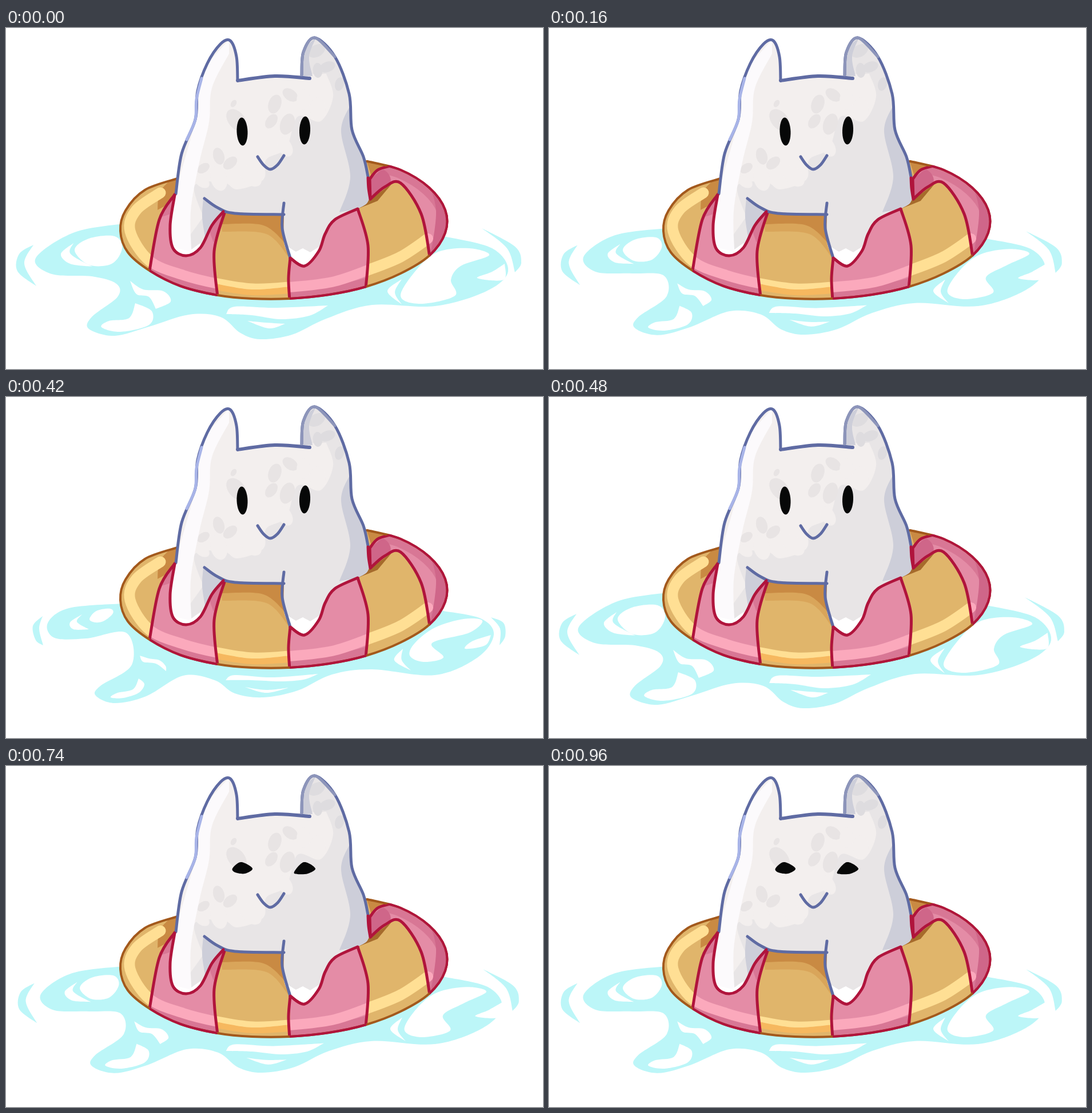
Write an HTML page with a canvas that moves like this. It is 939 px wide and 596 px high and loops after 1.12 s.

```html
<!DOCTYPE html>
<html lang="en">
<head>
<meta charset="utf-8">
<title>Floating cat</title>
<style>
  html, body { margin: 0; width: 100%; height: 100%; overflow: hidden; background: #fff; }
  canvas { display: block; }
</style>
</head>
<body>
<canvas id="stage" width="939" height="596"></canvas>
<script>
const ctx = document.getElementById('stage').getContext('2d');
ctx.lineCap = ctx.lineJoin = 'round';

// "x,y" marks a smooth point, "x,y!" a sharp corner.
const parse = text => text.split(' ').map(word => {
  const [x, y] = word.replace('!', '').split(',').map(Number);
  return { x, y, sharp: word.endsWith('!') };
});

// Smooth curve through all points; corners are doubled to break the tangent.
function curve(points, closed = true) {
  const nodes = points.flatMap(p => p.sharp ? [p, p] : [p]);
  const n = nodes.length;
  const at = i => nodes[closed ? (i + n) % n : Math.max(0, Math.min(n - 1, i))];
  const path = new Path2D();
  path.moveTo(nodes[0].x, nodes[0].y);
  for (let i = 0; i < (closed ? n : n - 1); i++) {
    const [a, b, c, d] = [at(i - 1), at(i), at(i + 1), at(i + 2)];
    if (b === c) continue;
    path.bezierCurveTo(b.x + (c.x - a.x) / 6, b.y + (c.y - a.y) / 6,
                       c.x - (d.x - b.x) / 6, c.y - (d.y - b.y) / 6, c.x, c.y);
  }
  return path;
}
const shape = text => curve(parse(text));
const merge = (...texts) => {
  const path = new Path2D();
  texts.forEach(text => path.addPath(shape(text)));
  return path;
};

function fill(color, path) {
  ctx.fillStyle = color;
  ctx.fill(typeof path === 'string' ? shape(path) : path);
}
function stroke(color, width, path) {
  ctx.strokeStyle = color;
  ctx.lineWidth = width;
  ctx.stroke(typeof path === 'string' ? curve(parse(path), false) : path);
}
function within(path, draw) {
  ctx.save();
  ctx.clip(path);
  draw();
  ctx.restore();
}

const BLUE = '#5f6ba3', RED = '#b0143c', BROWN = '#a3591c', WATER = '#bcf6f8', FOAM = '#fff';

// Water shapes go from wide to narrow; middle is the share of the way in the in-between pose.
function wave(color, wide, narrow, pose, middle = 0.42) {
  const share = [0, middle, 1][pose];
  const end = parse(narrow);
  fill(color, curve(parse(wide).map((p, i) => ({
    x: p.x + (end[i].x - p.x) * share,
    y: p.y + (end[i].y - p.y) * share,
    sharp: p.sharp
  }))));
}

function drawWater(pose) {
  wave(WATER,
    '215,341! 120,357 52,402 80,430 150,434 193,447 195,470 150,505 145,526 190,538 250,522 320,501 375,505 410,533 445,544 500,536 560,508 640,484 750,486 840,460 878,425 850,385 765,364!',
    '205,361! 110,369 73,395 85,421 140,422 210,412 220,468 165,505 157,522 190,535 245,523 310,487 365,495 400,518 450,525 510,513 570,485 640,476 750,486 825,455 853,415 830,387 765,374!', pose);
  wave(WATER, '48,379! 23,395 20,425 53,451! 32,412', '64,383! 47,400 52,425 65,434! 58,405', pose, 0.1);
  wave(WATER, '832,350! 890,382 901,410 890,427! 876,385', '848,385! 870,395 873,418 863,434! 864,405', pose, 0.15);
  // left foam
  wave(FOAM, '120,388 145,368 190,364 203,385 185,412 145,414', '146,388 158,374 182,370 187,378 172,391 156,394', pose, 0.35);
  wave(FOAM, '118,376! 96,395 112,412 151,417! 113,395', '133,380! 112,394 118,406 145,406! 124,393', pose);
  wave(FOAM, '217,442! 240,457 275,460 288,478 262,491! 250,470 228,465', '234,452! 250,457 268,460 279,470 280,479! 262,466 240,463', pose);
  wave(FOAM, '226,481! 255,495 250,519 200,531 167,523 180,512 215,507', '232,492! 242,502 232,517 205,526 183,525 195,517 222,511', pose);
  // front foam
  wave(FOAM, '385,500! 400,487 470,489 563,485! 530,503 480,509 430,502', '384,495! 400,486 465,490 546,484! 520,494 480,497 430,495', pose);
  wave(FOAM, '422,512! 455,515 488,517! 460,525', '418,507! 455,512 495,508! 455,517', pose);
  // right foam
  wave(FOAM, '756,391 810,385 845,397 795,416 778,440 785,468 725,482 690,468 720,420', '750,403 800,388 833,391 810,412 745,430 765,455 730,463 706,452 715,430', pose);
  wave(FOAM, '692,439! 667,460 692,483! 680,462', '694,440! 679,460 708,478! 692,460', pose);
  wave(FOAM, '872,412! 870,440 824,437 850,426', '848,416! 838,434 803,440 815,427', pose, 0.15);
}

const ring = shape('300,263! 243,283 209,319 200,355 213,392 251,424 305,451 370,467 430,473 495,473 565,466 630,452 690,429 740,398 768,358 768,318 740,279 690,248 632,233!');
const pink = merge(
  '295,291! 268,335 251,421! 251,445! 371,480! 364,390 383,320! 345,290!',
  '490,380! 497,402! 496,482! 629,470! 633,380 615,316! 560,300!',
  '636,264! 650,248 672,239! 790,240! 790,345! 742,404! 726,325 690,271 660,279 637,299!');
const rimLight = '270,288 228,318 217,355 251,407 310,432 370,447 432,456 495,453 570,444 633,423 690,400 738,368';

function drawRing() {
  within(ring, () => {
    fill('#e0b56b', ring);
    fill('#c98a43', '300,255! 270,285 265,318! 300,300!');
    fill('#c98a43', '628,225! 675,238! 640,262!');
    fill('#d9a55a', '375,325! 490,325! 494,400! 455,360 378,356!');
    fill('#c98a43', '375,318! 490,325! 490,378! 450,345 378,343!');
    stroke('#ffdf94', 19, rimLight);
    fill('#f6b85f', '367,447! 430,457 497,452! 497,464! 430,467 367,458!');
    within(pink, () => {
      fill('#e48ca6', pink);
      stroke('#d87795', 30, ring);
      fill('#d87795', '297,291! 268,328 288,325!');
      fill('#d87795', '352,345! 383,320! 363,375!');
      stroke('#fba9bc', 18, rimLight);
      fill('#cf6689', '737,265! 752,320 742,400! 790,360! 790,280!');
      fill('#cf6689', '637,264! 660,248 672,270 637,299!');
    });
    fill('#a66b2c', '608,319! 637,299! 674,273! 650,302!');
    stroke(RED, 5, '295,291 268,335 251,424');
    stroke(RED, 5, '383,320 364,390 370,470');
    stroke(RED, 5, '497,402 494,438 496,476');
    stroke(RED, 5, '615,316 633,380 629,456');
    stroke(RED, 5, '672,241 650,248 636,264! 637,299! 662,278 690,271 726,325 741,400');
  });
  stroke(BROWN, 4, ring);
  within(pink, () => stroke(RED, 4, ring));
}

const leftSide = '297,290! 307,220 331,160 335,110 352,62 375,28 392,22 403,50 405,92!';
const rightSide = '517,82! 520,42 540,17 575,50 600,115 605,178 625,225 633,260';
const rightPaw = '615,316! 575,335 558,360 547,390 522,416 497,402!';
const leftPaw = '380,321! 360,345 340,384 315,398 292,385 287,345 295,292!';
const body = shape([leftSide, rightSide, '636,285 632,305', rightPaw, '486,375 486,327!', leftPaw].join(' '));

// Soft fur marks: x, y, radius; the tilt follows from the place.
const marks = (color, list) => list.forEach(([x, y, r]) => {
  const mark = new Path2D();
  mark.ellipse(x, y, r, r * 0.65, x, 0, Math.PI * 2);
  fill(color, mark);
});

function drawCat() {
  within(body, () => {
    fill('#e8e5e6', body);
    fill('#f3efee', '280,420! 280,0! 420,0! 405,85! 560,80! 572,120 550,163 510,155 490,210 455,230 450,265 405,282 380,270 330,275 345,330!');
    marks('#e8e4e4', [[403, 161, 22], [470, 133, 17], [464, 163, 14], [492, 168, 19], [497, 117, 15], [372, 224, 15], [392, 236, 14], [345, 245, 12], [398, 132, 7]]);
    marks('#f3efee', [[545, 142, 21], [520, 125, 18], [488, 208, 18], [428, 259, 22], [372, 263, 22], [343, 269, 14]]);
    marks('#dedcdf', [[543, 40, 16], [562, 68, 14], [545, 74, 13], [583, 98, 12]]);
    fill('#fcfafc', '390,20! 335,90 331,160 295,290! 280,400! 325,400! 323,320 338,235 355,165 360,105 390,45!');
    fill('#cdced9', '602,135! 586,180 602,260 583,322! 650,310! 650,200!');
    fill('#cdced9', '515,85! 518,42 542,17! 530,50 536,84!');
    fill('#cdced9', '345,298! 385,322! 348,365! 343,330');
    fill('#fff', '285,370! 300,385! 320,390! 340,376! 340,405! 285,405!');
    fill('#fff', '492,382! 507,391! 519,385! 532,392! 548,382! 540,425! 495,425!');
  });
  stroke(BLUE, 5, leftSide);
  stroke(BLUE, 5, rightSide);
  stroke(BLUE, 6, '405,92 470,84 531,88');
  stroke('#a8b4e8', 5, '342,88 333,125 331,160 316,195');
  stroke('#8d95ba', 5, '517,82 520,42 540,17 575,50');
  stroke(BLUE, 5, '347,298 370,314 400,324 486,326');
  stroke(BLUE, 5, '486,306 483,350 497,402');
  stroke(BLUE, 5, '440,225 450,239 462,247 475,239 486,223');
  stroke(RED, 5, leftPaw);
  stroke(RED, 5, rightPaw);
  stroke(RED, 5, '633,262 634,280 637,299');
}

const openEyes = new Path2D();
openEyes.ellipse(413, 181, 9.5, 24.5, -0.04, 0, Math.PI * 2);
openEyes.closePath();
openEyes.moveTo(532, 179);
openEyes.ellipse(522.5, 179, 9.5, 24.5, 0.04, 0, Math.PI * 2);
const eyes = [
  openEyes,
  merge('396,179 411,168 431,179 418,188 401,186', '504,185 521,168 541,179 528,188 510,189'),
  merge('396,178 414,174 430,182 418,186 401,184', '504,185 518,175 538,176 538,186 512,188')
];

const STEP = 160;
const waterPoses = [0, 1, 2, 0, 1, 2, 1];
const eyePoses = [0, 0, 0, 0, 1, 2, 1];

function render() {
  const step = Math.floor(performance.now() / STEP) % waterPoses.length;
  ctx.fillStyle = '#fff';
  ctx.fillRect(0, 0, 939, 596);
  drawWater(waterPoses[step]);
  drawRing();
  drawCat();
  fill('#070808', eyes[eyePoses[step]]);
  requestAnimationFrame(render);
}
render();
</script>
</body>
</html>
```
